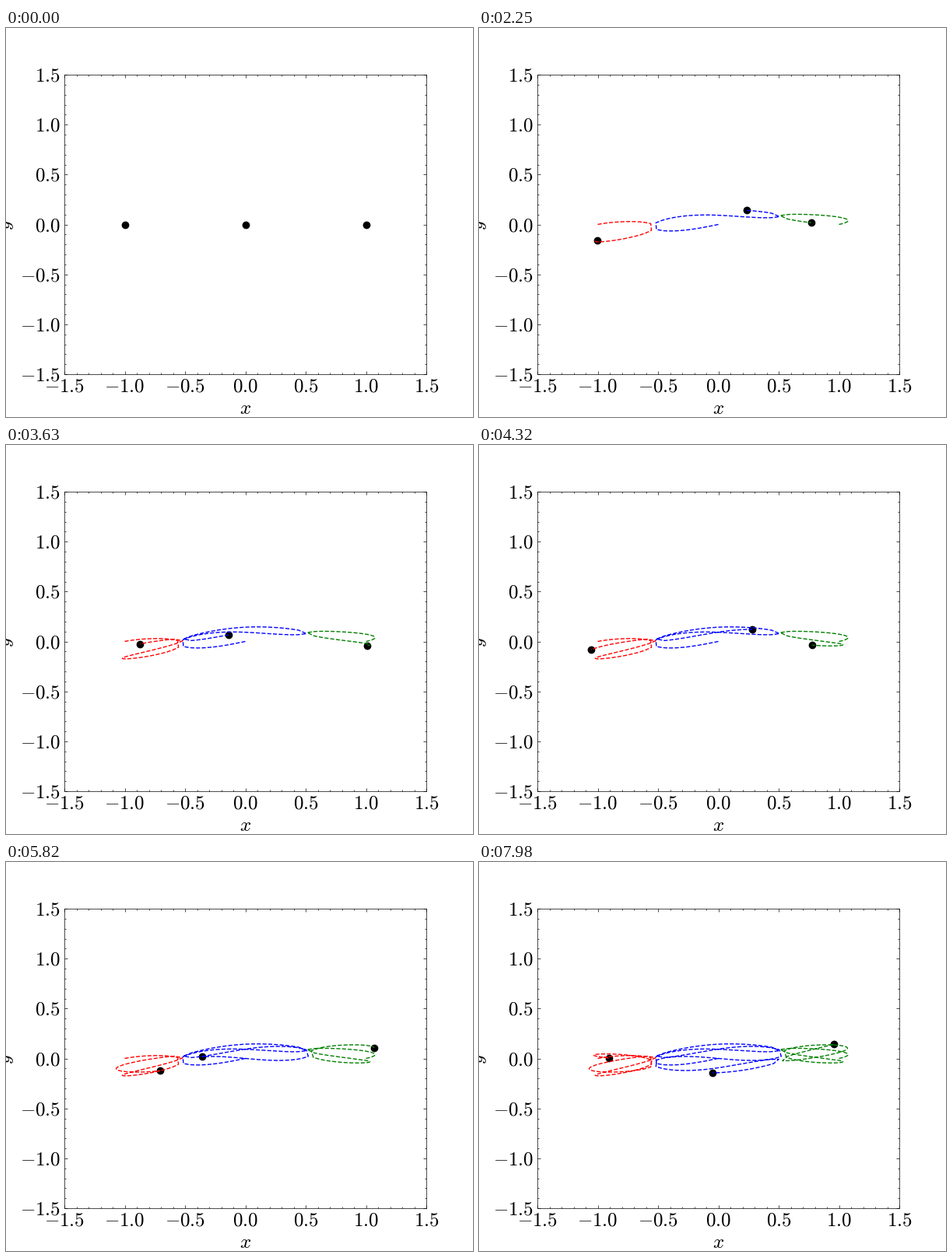
A matplotlib script for the animation above (8000 ms loop, 600x500 px).

```python
import numpy as np
import matplotlib.pyplot as plt
from matplotlib.animation import FuncAnimation
from matplotlib.ticker import AutoMinorLocator, FuncFormatter
from matplotlib.transforms import ScaledTranslation

FRAMES = 267
INTERVAL = 30      # ms
DT = 0.02          # simulated time per frame
ACCURACY = 0.006   # step size relative to the closest pair's timescale
VX, VY = 0.392955223941802, 0.0975792352080344

plt.rcParams.update({
    "mathtext.fontset": "cm",
    "font.family": "DejaVu Serif",
    "font.size": 18,
    "axes.linewidth": 0.5,
})


def pull(d):
    """Gravity of a unit mass at offset d (complex)."""
    return d / abs(d) ** 3


def slope(s):
    a, b, c, va, vb, vc = s
    ab, bc, ca = pull(b - a), pull(c - b), pull(a - c)
    return (va, vb, vc, ab - ca, bc - ab, ca - bc)


def shift(s, k, h):
    return [u + h * w for u, w in zip(s, k)]


def rk4(s, h):
    k1 = slope(s)
    k2 = slope(shift(s, k1, h / 2))
    k3 = slope(shift(s, k2, h / 2))
    k4 = slope(shift(s, k3, h))
    return [u + h / 6 * (p + 2 * q + 2 * r + w)
            for u, p, q, r, w in zip(s, k1, k2, k3, k4)]


def advance(s, span):
    """Integrate over span, with finer steps when two bodies are close."""
    while span > 0:
        a, b, c = s[:3]
        gap = min(abs(a - b), abs(b - c), abs(c - a))
        h = min(span, ACCURACY * gap ** 1.5)
        s = rk4(s, h)
        span -= h
    return s


def simulate():
    """Equal masses in a line, the middle one moving against the outer two."""
    v = complex(VX, VY)
    state = [-1 + 0j, 0j, 1 + 0j, v, -2 * v, v]
    path = [state[:3]]
    for _ in range(FRAMES - 1):
        state = advance(state, DT)
        path.append(state[:3])
    return np.array(path)


path = simulate()

fig = plt.figure(figsize=(6, 5), dpi=100, facecolor="white")
ax = fig.add_axes([0.125, 0.11, 0.775, 0.77])
ticks = np.linspace(-1.5, 1.5, 7)
ax.set(xlim=(-1.5, 1.5), ylim=(-1.5, 1.5), xticks=ticks, yticks=ticks)
ax.set_xlabel("$x$")
ax.set_ylabel("$y$")
for axis in (ax.xaxis, ax.yaxis):
    axis.set_minor_locator(AutoMinorLocator(5))
    axis.set_major_formatter(FuncFormatter(lambda v, _: f"${v:.1f}$"))
ax.tick_params(which="both", direction="in", top=True, right=True, width=0.5)
ax.tick_params(which="major", length=3)
ax.tick_params(which="minor", length=1.5)
ax.tick_params(axis="x", pad=3)

# Unsigned labels sit slightly higher than those with a minus.
lift = ScaledTranslation(0, 0.004, fig.dpi_scale_trans)
for label in ax.get_yticklabels()[3:]:
    label.set_transform(label.get_transform() + lift)

dots, = ax.plot([], [], "ko", ms=6, mew=1, zorder=1)
trails = [ax.plot([], [], color + "--", lw=1, zorder=2)[0] for color in "rbg"]


def draw(i):
    dots.set_data(path[i].real, path[i].imag)
    for trail, z in zip(trails, path[:i + 1].T):
        trail.set_data(z.real, z.imag)
    return [dots, *trails]


ani = FuncAnimation(fig, draw, frames=FRAMES, interval=INTERVAL,
                    repeat=True, repeat_delay=0, blit=False)
plt.show()
```
